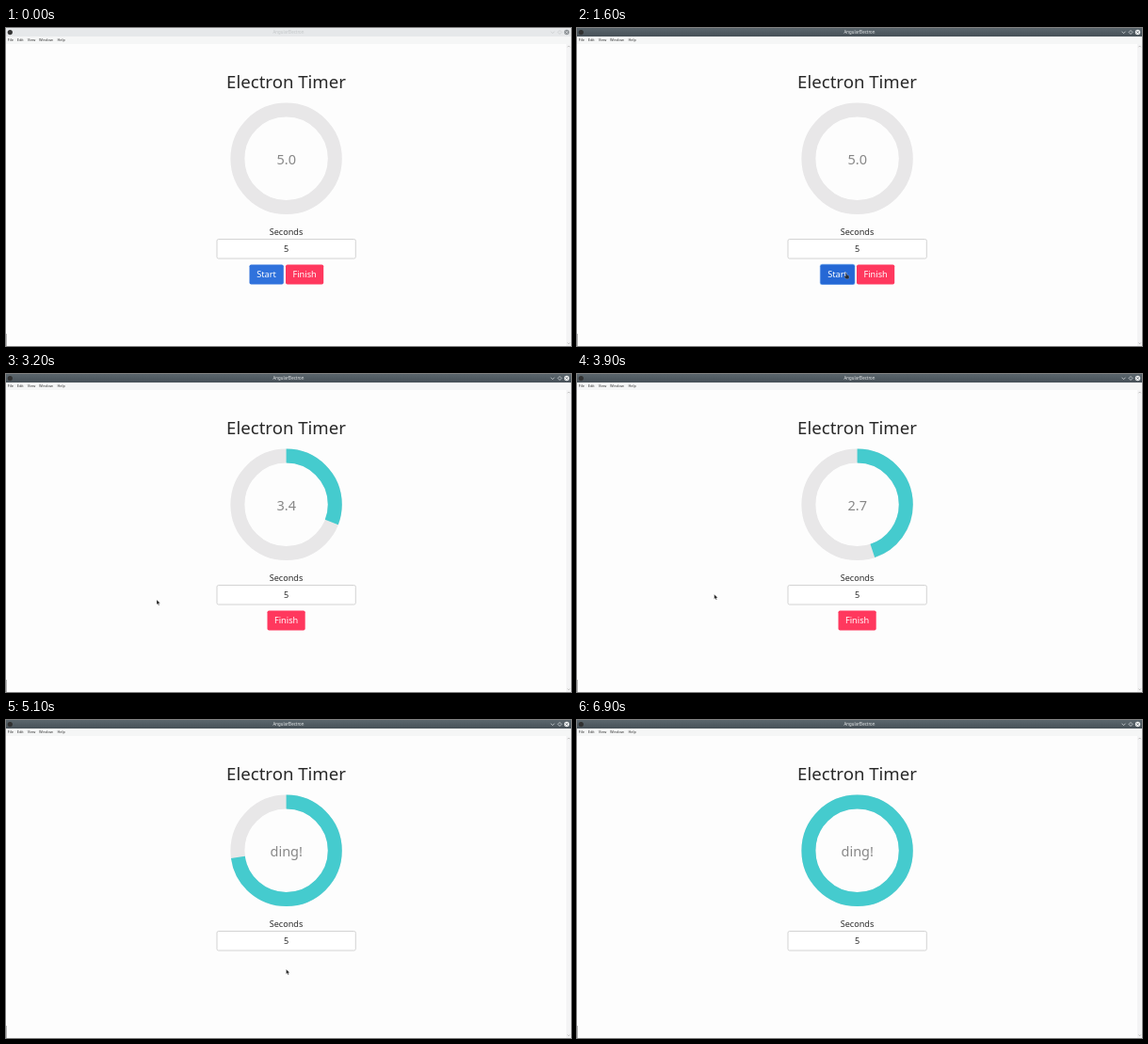
An HTML page that plays this animation: 600 px wide and 338 px high, repeating every 7.8 s.

```html
<!DOCTYPE html>
<html lang="en">
<head>
<meta charset="utf-8">
<title>Electron Timer</title>
<style>
  html, body { margin: 0; width: 100%; height: 100%; overflow: hidden; background: #fdfdfd; }
  svg { display: block; width: 100%; height: 100%; }
  text { font-family: "Noto Sans", "Open Sans", sans-serif; fill: #292929; }
  .mid { text-anchor: middle; }
  .menu { font-size: 3.9px; fill: #333; }
  .label { font-size: 9.1px; }
  .button text { fill: #fff; font-size: 9.2px; text-anchor: middle; }
  #count { font-size: 14.5px; font-weight: 300; fill: #888; }
</style>
</head>
<body>
<svg viewBox="0 0 600 338">
  <defs>
    <linearGradient id="dark" x2="0" y2="1">
      <stop stop-color="#5b666d"/><stop offset="1" stop-color="#465057"/>
    </linearGradient>
  </defs>
  <rect width="600" height="338" fill="#fdfdfd"/>

  <rect id="bar" width="600" height="9.3"/>
  <circle id="icon" cx="4.3" cy="4.6" r="2.6"/>
  <text id="caption" class="mid" x="300" y="6.2" font-size="4.35">AngularElectron</text>
  <g id="controls" fill="none" stroke-width=".7">
    <path d="M578.5 3.7l2 2 2-2M588 2.5l2 2-2 2-2-2z"/>
    <circle id="close" cx="595.5" cy="4.5" r="2.7" stroke="none"/>
    <path id="cross" d="M594.3 3.3l2.4 2.4m0-2.4l-2.4 2.4"/>
  </g>

  <rect y="9.3" width="600" height="7.7" fill="#f5f6f6"/>
  <g id="menu"></g>

  <rect x="595" y="17" width="5" height="321" fill="#f4f4f5"/>
  <path d="M596.4 20.3l1.2-1.3 1.2 1.3M596.4 334.5l1.2 1.3 1.2-1.3" fill="none" stroke="#999" stroke-width=".6"/>
  <path d="M.4 325v13" stroke="#999" stroke-width=".8"/>

  <text class="mid" x="297.5" y="64.2" font-size="18.6">Electron Timer</text>
  <g fill="none" stroke-width="15">
    <circle cx="297.6" cy="138.8" r="51.7" stroke="#e8e7e8"/>
    <circle id="ring" cx="297.6" cy="138.8" r="51.7" stroke="#45cbce" pathLength="1" transform="rotate(-90 297.6 138.8)"/>
  </g>
  <text id="count" class="mid" x="297.7" y="144.9"></text>

  <text class="mid label" x="297.5" y="220.2">Seconds</text>
  <rect id="input" x="224" y="224.5" width="147.3" height="20.5" rx="1.7" fill="#fff" stroke-width=".9"/>
  <text class="mid label" x="297.6" y="238">5</text>

  <g id="start" class="button">
    <rect id="halo" x="257.8" y="250.7" width="37.6" height="22.4" rx="2.6" fill="#8ebbf2"/>
    <rect id="face" x="258.5" y="251.4" width="36.3" height="21" rx="1.9"/>
    <text x="276.5" y="265.4">Start</text>
  </g>
  <g id="finish" class="button">
    <rect x="297" y="251.4" width="40.2" height="21" rx="1.9" fill="#ff385e"/>
    <text x="317.1" y="265.4">Finish</text>
  </g>

  <g id="pointer">
    <path id="arrow" d="M0 0v5l1.2-1 .8 1.9 .9-.4-.8-1.8 1.6-.1z" fill="#222" stroke="#fff" stroke-width=".25"/>
    <path id="hand" d="M0 0q.8-.6 1.1.3l.5 1.9 2.2.7 .2 2.5-.8 1.1h-2.5l-2.2-2.6 .8-.6 1 .6z" fill="#252c34" stroke="#dde" stroke-width=".25"/>
    <path id="beam" d="M-1.1-2.7h2.2M0-2.7v5.4M-1.1 2.7h2.2" fill="none" stroke="#555" stroke-width=".6"/>
  </g>
</svg>
<script>
const LOOP = 7800, STEP = 100;
const CLICK = 1300, RUN = 1700, DONE = 5000, FULL = 6200;
const el = id => document.getElementById(id);
const set = (id, attrs) => { for (const k in attrs) el(id).setAttribute(k, attrs[k]); };
const show = (id, on) => set(id, { visibility: on ? 'inherit' : 'hidden' });

const menu = [['File', 1.8], ['Edit', 11.8], ['View', 22.8], ['Window', 35], ['Help', 54.4]];
el('menu').innerHTML = menu.map(([s, x]) => `<text class="menu" x="${x}" y="14.4">${s}</text>`).join('');

// time, x, y of the pointer tip
const path = [
  [100, 322, 264], [500, 304, 266], [800, 288, 268.2], [1000, 288, 268.2],
  [1300, 285, 260.2], [1800, 285, 260.2], [2300, 271, 245], [2600, 269.7, 242.5],
  [2800, 262, 240], [3200, 160, 240], [3600, 147, 237], [3900, 145.7, 234.2],
  [4000, 165, 239], [4400, 250, 258], [4700, 297.5, 265], [6600, 297.5, 265],
  [6800, 94, 217]
];
const mix = (a, b, u) => a + (b - a) * u;

function pointerAt(t) {
  const i = path.findIndex(p => p[0] >= t);
  if (i < 1) return path[0].slice(1);
  const [t0, x0, y0] = path[i - 1], [t1, x1, y1] = path[i];
  const u = (t - t0) / (t1 - t0);
  return [mix(x0, x1, u), mix(y0, y1, u)];
}

function progress(t) {
  if (t <= 4900) return Math.max(0, (t - 1655) / 5000);
  if (t <= 5100) return mix(.649, .728, (t - 4900) / 200);
  return mix(.728, 1, Math.min(1, (t - 5100) / (FULL - 5100)) ** 1.6);
}

function draw(t) {
  const active = t >= CLICK, running = t >= RUN, done = t >= DONE;
  const ink = active ? '#e7eaec' : '#c6c9cb';
  set('bar', { fill: active ? 'url(#dark)' : '#e6e8ea' });
  set('icon', { fill: active ? '#303030' : '#333' });
  el('caption').style.fill = active ? '#eef0f1' : '#c2c5c7';
  set('controls', { stroke: ink });
  set('close', { fill: active ? '#eef0f1' : '#8d9296' });
  set('cross', { stroke: active ? '#454e55' : '#eceef0' });

  const p = progress(t);
  set('ring', { 'stroke-dasharray': p >= 1 ? 'none' : `${p} 2` });
  show('ring', p > 0);
  el('count').textContent = done ? 'ding!' : (5 - Math.max(0, t - 1600) / 1000).toFixed(1);

  const [x, y] = pointerAt(t);
  const inside = (l, r, top, bottom) => x > l && x < r && y > top && y < bottom;
  const visible = t >= 100 && t < 6900;
  const onInput = visible && inside(224, 371, 224.5, 245);
  const onStart = visible && !running && inside(258.5, 294.8, 251, 272.5);
  const onFinish = !done && (running ? inside(277.6, 317.8, 251, 272.5) : inside(297, 337, 251, 272.5));
  set('input', { stroke: onInput ? '#aaa' : '#cfcfcf' });
  show('start', !running);
  show('halo', active && !running);
  set('face', { fill: onStart ? '#2568d5' : '#3072dc' });
  show('finish', !done);
  set('finish', { transform: `translate(${running ? -19.5 : 0} 0)` });

  show('pointer', visible);
  set('pointer', { transform: `translate(${x} ${y})` });
  const hand = onStart || onFinish;
  show('hand', hand);
  show('beam', onInput);
  show('arrow', !hand && !onInput);
}

const begin = performance.now();
function tick() {
  const t = (performance.now() - begin) % LOOP;
  draw(Math.floor(t / STEP) * STEP);
  requestAnimationFrame(tick);
}
tick();
</script>
</body>
</html>
```
